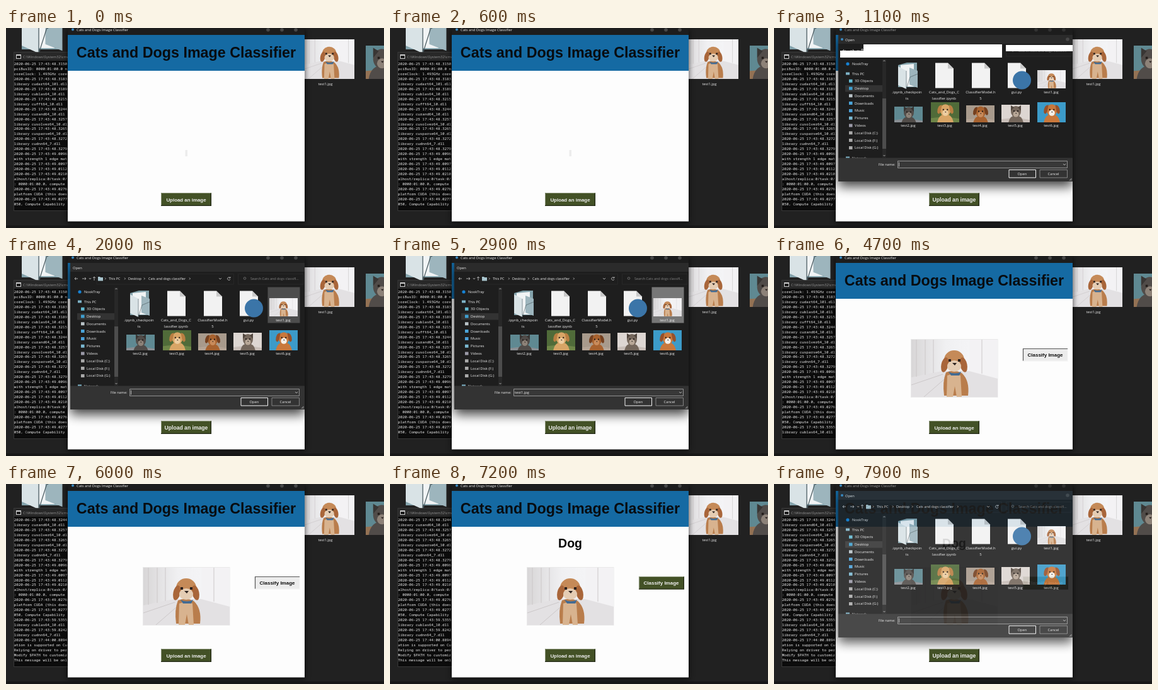
Recreate the animation shown at these times as an HTML page. Size 600 by 318 pixels, loop 8 s.

```html
<!DOCTYPE html>
<html lang="en">
<head>
<meta charset="utf-8">
<title>Image classifier demo</title>
<style>
  html, body { margin: 0; width: 100%; height: 100%; overflow: hidden; background: #212121; }
  svg { display: block; }
  text { font: 5.75px "Open Sans", sans-serif; fill: #eee; white-space: pre; }
  .mono text { font: 5.87px "Noto Sans Mono", monospace; fill: #ededed; }
  .bold { font-family: "Liberation Sans", Arial, sans-serif; font-weight: bold; }
  .small text { font-size: 5.45px; }
  .mid { text-anchor: middle; }
  .line { fill: none; stroke: #ccc; stroke-width: .8; }
</style>
</head>
<body>
<svg id="stage" width="600" height="318" viewBox="0 0 600 318">
  <defs>
    <linearGradient id="room">
      <stop offset="0" stop-color="#d8d6d7"/><stop offset=".4" stop-color="#f0f0f2"/><stop offset="1" stop-color="#f9f9fb"/>
    </linearGradient>
    <symbol id="poodle" viewBox="0 0 137 91" preserveAspectRatio="xMidYMid slice">
      <path fill="url(#room)" d="M0 0H137V91H0Z"/>
      <path fill="#e3e1e3" d="M0 60L48 50H137V91H0Z"/>
      <path fill="#f3f2f4" d="M92 0H137V62L92 50Z"/>
      <path stroke="#cbc7c8" fill="none" d="M8 0V59M22 0V56M35 0V53M0 72L50 55M20 91L58 58M112 0V54"/>
      <path fill="#b97d4c" d="M55 52Q68 47 80 53Q93 65 90 89H52Q49 67 55 52Z"/>
      <path fill="#d8b38f" d="M57 57Q68 52 78 57L80 91H72L69 74L66 91H56Z"/>
      <ellipse cx="68" cy="32" rx="16" ry="15" fill="#c58a58"/>
      <ellipse cx="53" cy="40" rx="5.5" ry="12" fill="#a9663a" transform="rotate(12 53 40)"/>
      <ellipse cx="83" cy="40" rx="5.5" ry="12" fill="#a9663a" transform="rotate(-12 83 40)"/>
      <ellipse cx="68" cy="42" rx="11" ry="9" fill="#e5cdb4"/>
      <path fill="#2b211e" d="M59 31h4v4h-4ZM74 31h4v4h-4ZM65 37h7l-3 4Z"/>
      <path fill="#426b93" d="M59 51Q69 56 79 51L76 57H63Z"/>
    </symbol>
    <g id="sitter">
      <path fill="var(--bg)" d="M0 0H45V30H0Z"/>
      <path fill="var(--floor)" d="M0 24Q23 20 45 25V30H0Z"/>
      <path fill="var(--fur)" d="M11 30Q13 18 23 18Q33 18 35 30Z"/>
      <ellipse cx="23" cy="12" rx="8" ry="9" fill="var(--fur)"/>
      <ellipse cx="23" cy="16" rx="4.500" ry="4.500" fill="var(--face)"/>
      <path fill="#241d1a" d="M19 10h2v2h-2ZM25 10h2v2h-2ZM22 14h2.4l-1 1.5Z"/>
    </g>
    <symbol id="cat" viewBox="0 0 45 30" preserveAspectRatio="xMidYMid slice">
      <use href="#sitter"/><path fill="var(--ear)" d="M15 2L20 5L15 11ZM31 2L26 5L31 11Z"/>
    </symbol>
    <symbol id="dog" viewBox="0 0 45 30" preserveAspectRatio="xMidYMid slice">
      <use href="#sitter"/><path fill="var(--ear)" d="M18 4Q11 4 11 15Q13 20 16 14ZM28 4Q35 4 35 15Q33 20 30 14Z"/>
    </symbol>
    <g id="folder">
      <path fill="#84a3ac" d="M0 4L14 0H30V39H0Z"/>
      <path fill="#f1f4f5" d="M4 4L25 2V38H4Z"/>
      <path fill="#9db5bd" d="M18 8L31 13V40L18 35Z"/>
      <path fill="#d9e3e6" d="M0 6L13 13V42L0 36Z"/>
      <path fill="none" stroke="#45565c" stroke-width=".6" d="M13 13V42L19 23L31 18"/>
    </g>
    <g id="page">
      <path fill="#f2f2f2" d="M0 0H20L29 9V40H0Z"/>
      <path fill="#c9c9c9" d="M20 0V9H29Z"/>
    </g>
    <filter id="shadow" y="-20%" height="140%"><feGaussianBlur stdDeviation="4"/></filter>
    <filter id="deepShadow" y="-20%" height="140%"><feGaussianBlur stdDeviation="9"/></filter>
  </defs>

  <path fill="#212121" d="M0 0H600V318H0Z"/>
  <path fill="#181818" d="M0 314H600V318H0Z"/>
  <use href="#folder" transform="translate(25 -47) scale(2.08)"/>
  <use href="#poodle" x="474" y="18" width="79" height="63"/>
  <use href="#cat" x="571" y="28" width="50" height="53" style="--bg:#5f8992;--floor:#947254;--fur:#514c49;--ear:#393634;--face:#8d8278"/>
  <text class="mid" x="507" y="90.5">test1.jpg</text>

  <path fill="#0c0c0c" stroke="#484848" stroke-width=".7" d="M12.5 38.5H110V290.5H12.5Z"/>
  <path fill="#282828" d="M13 39H110V52H13Z"/>
  <path fill="#d0d0d0" d="M16 42H24V49H16Z"/>
  <path fill="#151515" d="M17 44H23V48H17Z"/>
  <text x="27" y="47.5" fill-opacity=".55">C:\Windows\System32\cmd</text>
  <svg x="12" y="52" width="86" height="232"><g id="log" class="mono"></g></svg>

  <path filter="url(#shadow)" opacity=".6" d="M97 2H475V310H97Z"/>
  <path fill="#1d1d1d" d="M98 0H474V11H98Z"/>
  <circle cx="106" cy="2.5" r="2" fill="#3c8cc4"/>
  <text id="windowTitle" x="112" y="5">Cats and Dogs Image Classifier</text>
  <g id="windowButtons" fill="#484848"><circle cx="416" cy="3" r="2.8"/><circle cx="438" cy="3" r="2.8"/><circle cx="460" cy="3" r="2.8"/></g>
  <path fill="#fdfdfd" d="M98 11H474V307.500H98Z"/>
  <path fill="#156aa3" d="M98 11H474V68H98Z"/>
  <text class="bold mid" x="286" y="47" style="font-size:23.3px;fill:#080c10">Cats and Dogs Image Classifier</text>
  <path id="placeholder" fill="#ececec" d="M284.500 194H288V204H284.500Z"/>
  <text id="answer" class="bold mid" x="286" y="100.500" style="font-size:19.5px;fill:#080808">Dog</text>
  <g id="result">
    <path fill="#e9e9e9" d="M217 132H355.500V225H217Z"/>
    <use href="#poodle" x="218" y="133" width="137" height="91"/>
    <path id="classifyFace" d="M395 147H467V167.500H395Z"/>
    <path id="classifyTop" fill="none" stroke-width="1.2" d="M395.500 167V147.500H466"/>
    <path id="classifyBottom" fill="none" stroke-width="1.2" d="M395 167H466.400V148"/>
    <text id="classifyText" class="bold mid" x="430.500" y="160" style="font-size:8px">Classify Image</text>
  </g>

  <g id="dialog">
    <svg x="98" y="11" width="376" height="296.500" viewBox="98 11 376 296.500">
      <path filter="url(#deepShadow)" opacity=".75" d="M102 18H474V252H102Z"/>
    </svg>
    <path fill="#1e1e1e" d="M102 11H474V244H102Z"/>
    <path fill="#2b2b2b" d="M102 11H474V25H102Z"/>
    <path fill="#333" d="M102 206.500H474V244H102Z"/>
    <g id="dialogIcons"><circle cx="108" cy="18" r="2" fill="#3c8cc4"/><circle cx="466" cy="18" r="2.800" fill="#484848"/></g>
    <text id="dialogTitle" y="20.500">Open</text>
    <g class="small">
      <path class="line" d="M114 36H109M111 34L109 36L111 38M121 36H127M125 34L127 36L125 38M132 35L133.500 37L135 35M140 39V33M138 35L140 33L142 35"/>
      <path fill="none" stroke="#2c2c2c" stroke-width=".7" d="M144 28.500H361.500V45H144ZM368.500 28.500H472V45H368.500Z"/>
      <path fill="#a9c5ce" d="M146 33H149L150 34H154V39.500H146Z"/>
      <path class="line" d="M157 34.500L158.500 36L157 37.500M188 34.500L189.500 36L188 37.500M219 34.500L220.500 36L219 37.500M291 34.500L292.500 36L291 37.500M338 35L340 37L342 35M355.500 34.500A2.300 2.300 0 1 0 356 37M356 33V35H354"/>
      <text x="163" y="38">This PC</text><text x="194" y="38">Desktop</text><text x="226" y="38">Cats and dogs classifier</text>
      <circle cx="379" cy="35.500" r="1.800" class="line" stroke-opacity=".5"/>
      <text x="388" y="38" fill-opacity=".5">Search Cats and dogs classifi...</text>
    </g>
    <path id="blank" fill="#fff" d="M105 36H142V26H362V47H105ZM368 27H474V37H368Z"/>
    <path fill="#333" d="M113 91H172V101.500H113Z"/>
    <path fill="#282828" d="M172 50H178V206.500H172Z"/>
    <path fill="#4d4d4d" d="M172 112H178V192H172Z"/>
    <path class="line" d="M173.500 53L175 51.500L176.500 53M173.500 202L175 203.500L176.500 202"/>
    <svg x="102" y="48" width="76" height="158.500" viewBox="102 48 76 158.500" id="sidebar"></svg>
    <path id="selection" d="M415.500 49.500H466.500V106.500H415.500Z"/>
    <g id="topFiles"></g>
    <g id="bottomFiles"></g>
    <text x="166" y="218.500" style="font-size:5.5px">File name:</text>
    <path fill="#383838" stroke="#aaa" stroke-width=".8" d="M196.500 211.500H465.500V222.500H196.500Z"/>
    <path class="line" d="M459 216L461 218L463 216"/>
    <path id="caret" stroke="#eee" stroke-width=".7" d="M198.500 213.500V220.500"/>
    <text id="fileName" x="198" y="219">test1.jpg</text>
    <path fill="#333" stroke="#f4f4f4" d="M373 225.500H415.500V238H373Z"/>
    <path fill="#333" stroke="#999" stroke-width=".8" d="M422 225.500H465.500V238H422Z"/>
    <text class="mid" x="394" y="234">Open</text><text class="mid" x="443.500" y="234">Cancel</text>
    <path class="line" d="M472.500 239L469 242.500M472.500 241L471 242.500"/>
  </g>

  <path fill="#435126" d="M246 262H326V283H246Z"/>
  <path fill="none" stroke="#8b957a" d="M246.500 282V262.500H325"/>
  <path fill="none" stroke="#252b18" stroke-width="1.3" d="M246 282.400H325.400V263"/>
  <text id="uploadText" class="bold mid" x="286" y="275.500">Upload an image</text>
</svg>
<script>
const LOOP = 8000, ROW = 7.96;
const $ = id => document.getElementById(id);
const stamp = s => "2020-06-25 17:" + s;
const dll = s => `library ${s}64_10.dll`;

const logLines = [
  stamp("43:48.3150"), "pciBusID: 0000:01:00.0 n", "coreClock: 1.493GHz core",
  stamp("43:48.3183"), "library cudart64_101.dll", stamp("43:48.3189"), dll("cublas"),
  stamp("43:48.3215"), dll("cufft"), stamp("43:48.3244"), dll("curand"),
  stamp("43:48.3257"), dll("cusolver"), stamp("43:48.3265"), dll("cusparse"),
  stamp("43:48.3272"), "library cudnn64_7.dll", stamp("43:48.3279"),
  stamp("43:49.0096"), "with strength 1 edge mat", stamp("43:49.0097"),
  stamp("43:49.0112"), stamp("43:49.0210"), "alhost/replica:0/task:0/",
  ": 0000:01:00.0, compute ", stamp("43:49.0276"), "platform CUDA (this does",
  stamp("43:49.0277"), "050, Compute Capability ", stamp("43:59.5355"), dll("cublas"),
  stamp("43:59.8242"), "library cudnn64_7.dll", stamp("44:00.8894"),
  "ation is supported on Cu", "Relying on driver to per", "Modify $PATH to customiz", "This message will be onl"
];
$("log").innerHTML = logLines.map((s, i) => `<text x=".7" y="${7 + i * ROW}">${s}</text>`).join("");

const places = ["3D Objects", "Desktop", "Documents", "Downloads", "Music", "Pictures", "Videos",
  "Local Disk (C:)", "Local Disk (F:)", "Local Disk (G:)"];
const placeColors = ["#63b8cf", "#3f9fd0", "#b9c3c8", "#4aa3d8", "#4a9fd8", "#7bb9d2", "#9b9aa8", "#aaa", "#aaa", "#aaa"];
$("sidebar").innerHTML = `<circle cx="117" cy="57" r="2.6" fill="#1682d4"/><text x="124" y="58.700">NookTray</text>
  <path fill="#7fb3c8" d="M114 70.500h6v4h-6Z"/><text x="124" y="74.700">This PC</text>
  <path fill="#7fb3c8" d="M114 204.500h6v4h-6Z"/><text x="124" y="209">Network</text>` +
  places.map((s, i) => {
    const y = 84.2 + i * 11.8;
    return `<path fill="${placeColors[i]}" d="M119 ${y - 2.5}h5.500v5h-5.500Z"/><text x="128" y="${y + 2}">${s}</text>`;
  }).join("");

const label = (x, y, ...rows) => rows.map((s, i) =>
  `<text class="mid" x="${x}" y="${y + i * 9.5}" style="font-size:5.9px">${s}</text>`).join("");
const pet = (kind, x, y, h, name, ...colors) => {
  const vars = ["bg", "floor", "fur", "ear", "face"].map((k, i) => `--${k}:${colors[i]}`).join(";");
  return `<use href="#${kind}" x="${x}" y="${y}" width="45" height="${h}" style="${vars}"/>` + label(x + 22, 157, name);
};
$("topFiles").innerHTML =
  `<use href="#folder" x="197" y="55"/><use href="#page" x="256" y="55.500"/>
   <use href="#page" x="314" y="55.500"/><use href="#page" x="371" y="55.500"/>
   <circle cx="393.500" cy="83" r="14.500" fill="#3b75a8"/>
   <use href="#poodle" x="418" y="67" width="45" height="29"/>` +
  label(211, 104, ".ipynb_checkpoin", "ts") + label(270, 104, "Cats_and_Dogs_C", "lassifier.ipynb") +
  label(328, 104, "ClassifierModel.h", "5") + label(385, 104, "gui.py") + label(440, 104, "test1.jpg");
$("bottomFiles").innerHTML =
  pet("cat", 191, 125, 25, "test2.jpg", "#5f8992", "#8a8f94", "#514c49", "#393634", "#8d8278") +
  pet("dog", 249, 118, 32, "test3.jpg", "#506b39", "#6d8548", "#d8a566", "#b97e42", "#edcda0") +
  pet("dog", 305, 123, 27, "test4.jpg", "#a89a8c", "#b5a597", "#a8622f", "#75401f", "#c98b5b") +
  pet("cat", 361, 122, 28, "test5.jpg", "#ddd6d2", "#c9bfb9", "#75675c", "#51463e", "#b8a797") +
  pet("dog", 418, 118, 32, "test6.jpg", "#3c9bc9", "#3c9bc9", "#c9783c", "#97512a", "#f4efe8");

const show = (id, on) => $(id).style.display = on ? "" : "none";
const set = (id, name, value) => $(id).setAttribute(name, value);
const ramp = (t, from, to) => Math.min(1, Math.max(0, (t - from) / (to - from)));

function draw(t) {
  const reopened = t >= 7780;
  const opacity = reopened ? ramp(t, 7780, 7916) : ramp(t, 900, 1040) * (1 - ramp(t, 3150, 3260));
  const open = opacity > 0;
  const fresh = reopened || t < 1500;
  const chosen = t >= 2300 && !reopened;
  const loaded = t >= 3300;
  const busy = t >= 4400 && t < 6350;
  const scroll = t >= 5850 ? 9 : t >= 4900 ? 4 : t >= 4600 ? 2 : 0;

  show("dialog", open);
  set("dialog", "opacity", opacity);
  show("blank", t < 1300);
  show("dialogIcons", fresh);
  set("dialogTitle", "x", fresh ? 113 : 106);
  show("selection", t >= 2000 && !reopened);
  set("selection", "fill", chosen ? "#777" : "#4d4d4d");
  set("bottomFiles", "transform", `translate(0 ${reopened ? 10 : 0})`);
  show("fileName", chosen);
  show("caret", !chosen);

  const dimmed = open && fresh;
  set("windowTitle", "fill-opacity", dimmed ? .6 : 1);
  set("windowButtons", "opacity", dimmed ? .5 : 1);
  $("uploadText").style.fontSize = open ? "8.6px" : "7.9px";
  set("log", "transform", `translate(0 ${-scroll * ROW})`);
  show("placeholder", !loaded);
  show("result", loaded);
  show("answer", t >= 6400);
  set("classifyFace", "fill", busy ? "#ececec" : "#435126");
  set("classifyTop", "stroke", busy ? "#555" : "#8b957a");
  set("classifyBottom", "stroke", busy ? "#fafafa" : "#252b18");
  $("classifyText").style.fill = busy ? "#111" : "#eee";
}

function tick() {
  draw(performance.now() % LOOP);
  requestAnimationFrame(tick);
}
tick();
</script>
</body>
</html>
```
